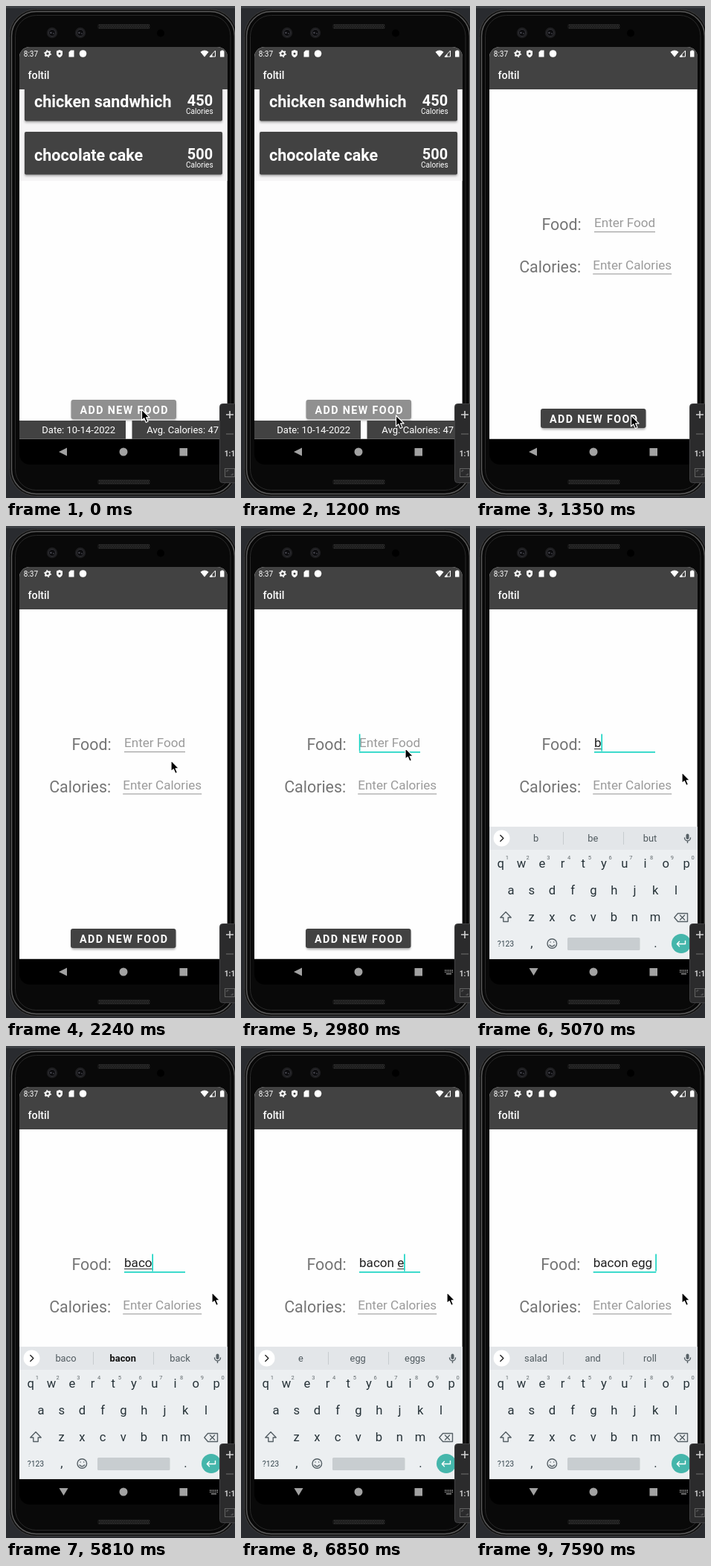
Animation, 308 px wide and 661 px high, one loop 8000 ms. Source, as an HTML page:

```html
<!DOCTYPE html>
<html lang="en">
<head>
<meta charset="utf-8">
<title>Food log</title>
<style>
html, body { margin: 0; width: 100%; height: 100%; overflow: hidden; background: #292b2f; }
svg { display: block; width: 308px; height: 661px; }
text { font-family: Roboto, Arial, sans-serif; white-space: pre; }
.mid { text-anchor: middle; }
.bold { font-weight: 700; }
.big { font-size: 21.4px; }
.field { font-size: 17.1px; }
.bar { font-size: 13.02px; fill: #fff; }
.card { fill: #fff; }
.btn { font-size: 14.25px; font-weight: 700; letter-spacing: 1.4px; fill: #fff; }
.label { fill: #757575; }
.hint { fill: #9b9b9b; }
.key { font-size: 16.6px; fill: #263238; }
.num { font-size: 7.5px; fill: #60686c; }
.sug { font-size: 12.83px; fill: #505a5f; }
.sug.bold { fill: #111; }
.line { fill: none; stroke: #566066; stroke-width: 1.4; stroke-linecap: round; stroke-linejoin: round; }
</style>
</head>
<body>
<svg viewBox="0 0 308 661" xmlns="http://www.w3.org/2000/svg">
  <defs>
    <clipPath id="screenClip"><path d="M18 69a14 14 0 0 1 14-14H284a14 14 0 0 1 14 14V581.700H18Z"/></clipPath>
    <clipPath id="pageClip"><path d="M18 112H298V582H18Z"/></clipPath>
    <filter id="soft" x="-10%" y="-30%" width="120%" height="170%"><feGaussianBlur stdDeviation="1.6"/></filter>
    <g id="grill">
      <rect width="71" height="7" rx="3" fill="#161616"/>
      <path d="M2 1.5H70M3 3.5H70M2 5.5H70" stroke="#444" stroke-dasharray="1.2 1.2"/>
    </g>
    <g id="lens">
      <circle r="7.2" fill="#1e1e20"/><circle r="4.6" fill="#0c0c0e" stroke="#303035"/>
      <circle cx="-1.6" r="1.3" fill="#45454d"/><circle cx="2" cy="1" r="1" fill="#383840"/>
    </g>
    <g id="mic">
      <rect x="-2" y="-6" width="4" height="7.6" rx="2" fill="#566066"/>
      <path class="line" d="M-4 -.5a4 4 0 0 0 8 0M0 3.8V6"/>
    </g>
  </defs>

  <!-- device -->
  <rect width="308" height="661" fill="#292b2f"/>
  <rect width="308" height="3" fill="#3d4044"/>
  <rect x="4.500" y="4.500" width="306" height="654" rx="36" fill="#121212" stroke="#3c3c3c"/>
  <rect x="7.500" y="7.500" width="300" height="648" rx="33" fill="#080808" stroke="#585858" stroke-width="1.500"/>
  <rect x="12.500" y="12.500" width="289.500" height="638" rx="28" fill="#090909" stroke="#2a2a2a"/>
  <use href="#grill" x="123" y="24"/><use href="#grill" x="123" y="636"/>
  <use href="#lens" x="62" y="36"/><use href="#lens" x="100" y="36"/>
  <circle cx="208" cy="36.500" r="5" fill="#000"/>
  <path d="M18 581H298V602a14 14 0 0 1-14 14H32a14 14 0 0 1-14-14Z" fill="#000"/>

  <g clip-path="url(#screenClip)">
    <rect x="18" y="55" width="279.600" height="527" fill="#fefefe"/>

    <g id="list" clip-path="url(#pageClip)">
      <rect x="18" y="112" width="279.600" height="123" fill="#f6f5f6"/>
      <g id="cards"></g>
      <rect x="88" y="531" width="141" height="26" rx="3" fill="#777" opacity=".5" filter="url(#soft)"/>
      <rect x="87.500" y="529" width="141.500" height="26" rx="3" fill="#909090"/>
      <text class="btn" x="99.500" y="547.500">ADD NEW FOOD</text>
      <path d="M18 557H161V582H18ZM169.500 557H298V582H169.500Z" fill="#424242"/>
      <text class="bar" x="48.300" y="574">Date: 10-14-2022</text>
      <text class="bar" x="189.300" y="574">Avg. Calories: 475</text>
    </g>

    <g id="form">
      <text id="foodLabel" class="big label" y="301">Food:</text>
      <text class="big label" x="58.200" y="357.700">Calories:</text>
      <text class="field hint" x="157.200" y="354.100">Enter Calories</text>
      <rect x="157.200" y="359.500" width="106" height="1" fill="#929292"/>
      <text id="foodHint" class="field hint" x="159" y="297.300">Enter Food</text>
      <text id="foodText" class="field" y="297.300" fill="#212121"></text>
      <rect id="compose" y="299" height="1" fill="#333"/>
      <rect id="underline" y="303"/>
      <rect id="caret" y="279.500" width="1.600" height="23" fill="#10d2c0"/>
      <rect x="88" y="543" width="140" height="26" rx="3" fill="#555" opacity=".5" filter="url(#soft)"/>
      <rect x="87" y="541" width="141.500" height="26" rx="3" fill="#424242"/>
      <text class="btn" x="99" y="559.700">ADD NEW FOOD</text>
    </g>

    <g id="keyboard">
      <rect x="18" y="404" width="280" height="178" fill="#eceff1"/>
      <rect x="18" y="404" width="280" height="31" fill="#e3e6e9"/>
      <circle cx="34.500" cy="419.500" r="11" fill="#fff"/>
      <path id="chevron" class="line" style="stroke:#222"/>
      <use href="#mic" x="284.500" y="419.500"/>
      <g id="tools">
        <circle class="line" cx="70.500" cy="418" r="3.700"/><path class="line" d="M73.500 421L77 424.500"/>
        <path class="line" d="M109 414H116a2 2 0 0 1 2 2V420L113 425H109a2 2 0 0 1-2-2V416a2 2 0 0 1 2-2ZM118 420H115a2 2 0 0 0-2 2V425M110 420.500q2 1.500 3 0M110.500 417.500h.1M114.500 417.500h.1"/>
        <text class="mid bold" x="152.800" y="423" font-size="9.600" letter-spacing=".5" fill="#566066">GIF</text>
        <rect x="189.500" y="414" width="11" height="11" fill="#69737a"/>
        <path d="M219.500 411V428" stroke="#c7cccf"/>
        <g fill="#566066"><circle cx="240.500" cy="419.500" r="1.400"/><circle cx="245" cy="419.500" r="1.400"/><circle cx="249.500" cy="419.500" r="1.400"/></g>
      </g>
      <g id="words">
        <path d="M117.500 411V428M198.500 411V428" stroke="#c7cccf"/>
        <text class="sug mid" x="80.500" y="424.300"></text>
        <text class="sug mid" x="157.200" y="424.300"></text>
        <text class="sug mid" x="234" y="424.300"></text>
      </g>
      <g id="keys"></g>
      <path class="line" d="M40 518.500L32.800 526H36.800V531.500H43.200V526H47.200Z"/>
      <path class="line" d="M271.500 520.500H284.500V531.500H271.500L266.800 526ZM274.500 523L280.500 529M280.500 523L274.500 529"/>
      <text class="mid" x="40" y="565" font-size="10.400" fill="#37474f">?123</text>
      <circle class="line" cx="102.300" cy="561" r="6.300"/>
      <path class="line" d="M99 563q3.300 3.500 6.600 0M100 559h.1M104.600 559h.1"/>
      <rect x="123" y="553" width="97.500" height="17" rx="1.500" fill="#c8cdd0"/>
      <circle cx="276" cy="561" r="13" fill="#45b6ab"/>
      <path class="line" style="stroke:#fff" d="M281.500 557.500V561.500H270.500M273.500 558.300L270.300 561.500L273.500 564.700"/>
    </g>

    <!-- status and title bars -->
    <rect x="18" y="55" width="280" height="57" fill="#424242"/>
    <text x="23.800" y="67.500" font-size="10" fill="#fff">8:37</text>
    <circle cx="56" cy="64" r="2.800" fill="none" stroke="#fff" stroke-width="2"/>
    <circle cx="56" cy="64" r="4.300" fill="none" stroke="#fff" stroke-width="1.300" stroke-dasharray="1.800 2.700"/>
    <path d="M72 59L76 60.500V64q0 3.600-4 5.200q-4-1.600-4-5.200V60.500Z" fill="#fff"/>
    <circle cx="72" cy="64" r="1.500" fill="#424242"/>
    <path d="M87 59.500H91.500V68.500H84.500V62Z" fill="#fff"/>
    <circle cx="103.500" cy="64" r="4.800" fill="#fff"/>
    <path d="M261.500 61.800q5.500-4.500 11 0L267 68.500Z" fill="#fff"/>
    <path d="M281.500 60V68H274Z" fill="none" stroke="#fff"/>
    <path d="M277.500 64.500V68.500H273.500Z" fill="#fff"/>
    <path d="M289.500 59.500H292.500V60.500H293.500V68.500H288V60.500H289.500Z" fill="#fff"/>
    <text x="29.500" y="98" font-size="14.250" font-weight="500" fill="#fff">foltil</text>
  </g>

  <!-- navigation -->
  <g fill="#a2a2a2">
    <path id="back"/>
    <circle cx="158" cy="599" r="5.500"/>
    <rect x="233.500" y="594" width="10.500" height="10.500"/>
    <g id="kbIcon">
      <path d="M274 597h11M274 599.300h11" stroke="#a2a2a2" stroke-width="1.300" stroke-dasharray="1.400 1"/>
      <path d="M276 601.700h7" stroke="#a2a2a2" stroke-width="1.300"/>
    </g>
  </g>

  <!-- side toolbar -->
  <rect x="287.500" y="534.500" width="30" height="106" rx="4" fill="#2b2b2c" stroke="#414143"/>
  <path d="M296 549H306M301 544V554" stroke="#d2d2d2" stroke-width="1.600"/>
  <path d="M296 575H306" stroke="#626262" stroke-width="1.300"/>
  <text class="mid bold" x="301" y="605" font-size="10" fill="#d2d2d2">1:1</text>
  <g fill="none" stroke="#626262"><rect x="294.500" y="621.500" width="13" height="11"/><path d="M297 626V624H299.500M305 628V630H302.500"/></g>

  <path id="pointer" d="M0 0V14.800L3.300 11.800L5.800 17.500L8.500 16.300L6.100 10.800H10.600Z" fill="#000" stroke="#fff" stroke-width="1.200" stroke-linejoin="round"/>
</svg>
<script>
const LOOP = 8000;
const $ = id => document.getElementById(id);
const show = (el, on) => { el.style.display = on ? '' : 'none'; };
const set = (el, attrs) => { for (const k in attrs) el.setAttribute(k, attrs[k]); };
const text = (cls, x, y, s, size = '') =>
  `<text class="${cls}" x="${x}" y="${y}"${size && ` font-size="${size}"`}>${s}</text>`;

const pen = document.createElement('canvas').getContext('2d');
const width = s => { pen.font = '17.1px Roboto, Arial, sans-serif'; return pen.measureText(s).width; };

$('cards').innerHTML = [['chicken sandwhich', 450], ['chocolate cake', 500]].map(([name, cal], i) => {
  const y = 97 + 72 * i;
  return `<rect x="25" y="${y + 1.5}" width="266" height="58" rx="2" fill="#888" opacity=".7" filter="url(#soft)"/>
    <rect x="25" y="${y}" width="266" height="57.500" rx="2" fill="#424242"/>` +
    text('card bold', 38, y + 38.7, name, 21.55) +
    text('card bold mid', 261, y + 36.5, cal, 19.95) +
    text('card mid', 260.3, y + 47.7, 'Calories', 10.1);
}).join('');

const row = (letters, x, y) => [...letters].map((c, i) => text('key mid', x + 27.75 * i, y, c)).join('');
$('keys').innerHTML = row('qwertyuiop', 33.3, 459.3) + row('asdfghjkl', 47, 495.3) +
  row('zxcvbnm', 74.5, 531.3) + text('key mid', 75, 566, ',') + text('key mid', 241.5, 566, '.') +
  [...'1234567890'].map((c, i) => text('num mid', 41.8 + 27.75 * i, 447.5, c)).join('');

// [time, x, y]
const pointerSteps = [
  [0, 182.5, 542], [300, 184, 543], [450, 187, 545], [600, 191, 548], [750, 196, 550],
  [900, 202, 550], [1050, 206, 550], [1200, 208.5, 550],
  [1790, 209, 530], [1940, 213, 468], [2090, 218, 385], [2240, 222, 315],
  [2390, 224, 275], [2540, 222, 288], [2690, 221, 298.5],
  [3130, 244, 311], [3280, 267, 322], [3580, 273, 328], [3730, 277, 331]
];
// [time, typed, start of the word being composed]
const typing = [
  [0, '', 0], [5070, 'b', 0], [5210, 'ba', 0], [5510, 'bac', 0], [5810, 'baco', 0], [5960, 'bacon', 0],
  [6410, 'bacon ', 6], [6850, 'bacon e', 6], [7000, 'bacon eg', 6], [7150, 'bacon egg', 6], [7590, 'bacon egg ', 10]
];
// [time, suggestions, middle one bold]
const hints = [
  [0, '', 0], [5070, 'b be but', 0], [5210, 'ba bad back', 0], [5510, 'bac back bacon', 0],
  [5810, 'baco bacon back', 1], [5960, 'bacon bacon baron', 1], [6560, 'wrapped and is', 0],
  [6850, 'e egg eggs', 0], [7000, 'eg egg eggs', 1], [7150, 'egg eggs eggy', 0], [7590, 'salad and roll', 0]
];
const caretSteps = [[0, 0], [2690, 1], [3280, 0], [3730, 1], [4320, 0], [4770, 1]];
const at = (steps, t) => steps.findLast(s => s[0] <= t);

const words = [...$('words').querySelectorAll('text')];

function render(t) {
  const [, px, py] = at(pointerSteps, t);
  set($('pointer'), { transform: `translate(${px} ${py})` });

  const onForm = t >= 1350, focused = t >= 2690, keys = t >= 3130;
  show($('list'), !onForm);
  show($('form'), onForm);

  const [, typed, from] = at(typing, t);
  const len = width(typed), w = Math.max(82, len + .8);
  const left = w > 82.5 ? 157.7 : 159;
  set($('foodLabel'), { x: left - 70.5 });
  show($('foodHint'), !typed);
  $('foodText').textContent = typed;
  set($('foodText'), { x: left });
  const start = width(typed.slice(0, from));
  set($('compose'), { x: left + start, width: Math.max(0, len - start) });
  set($('underline'), {
    x: left, width: w, height: focused ? 1.6 : 1, fill: focused ? '#10d2c0' : '#929292'
  });
  show($('caret'), at(caretSteps, t)[1]);
  set($('caret'), { x: left + len - .2 });

  show($('keyboard'), keys);
  set($('keyboard'), { transform: `translate(0 ${t < 3280 ? 48 : 0})` });
  show($('kbIcon'), t >= 2840);
  set($('back'), { d: keys ? 'M71.500 594H83.500L77.500 604Z' : 'M82 593.500V604.500L71 599Z' });

  const [, list, strong] = at(hints, t);
  show($('tools'), !list);
  show($('words'), list);
  set($('chevron'), { d: list ? 'M32.800 415.500L36.800 419.500L32.800 423.500' : 'M36 415.500L32 419.500L36 423.500' });
  list.split(' ').forEach((s, i) => {
    words[i].textContent = s;
    words[i].classList.toggle('bold', i === 1 && !!strong);
  });
}

function tick() {
  render(performance.now() % LOOP);
  requestAnimationFrame(tick);
}
tick();
</script>
</body>
</html>
```
